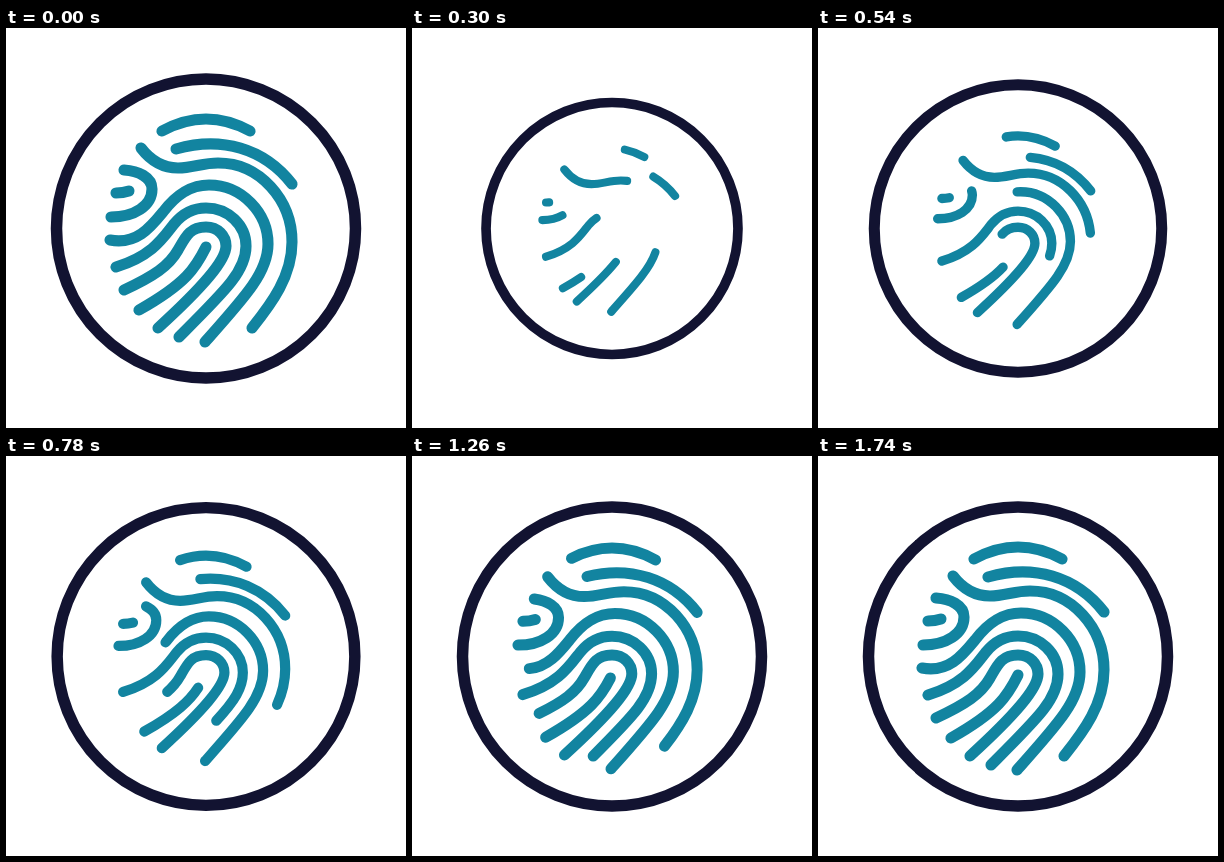
These frames come from a looping animation (400x400 px, 1.8 s). An HTML page:

```html
<!DOCTYPE html>
<html lang="en">
<head>
<meta charset="utf-8">
<title>Fingerprint</title>
<style>
html, body { margin: 0; width: 100%; height: 100%; overflow: hidden; background: #fff; }
svg { display: block; width: 100%; height: 100%; }
g { fill: none; stroke-linecap: round; stroke-linejoin: round; }
</style>
</head>
<body>
<svg viewBox="0 0 400 400">
  <g id="ring" stroke="#121331" stroke-width="11.5"><circle r="149.5"/></g>
  <g id="print" stroke="#1284a0" stroke-width="11.1"></g>
</svg>
<script>
const LOOP = 1800, STEP = 30, END = 1740;
const ERASED = 230, REDRAW = 245;

// Ridges of the print; those in "back" erase from their start and regrow from it.
const ridges = [
  "M156 103Q200 79 244 103",
  "M170 121C215 108 258 120 286 156",
  "M118 142C132 143 146 149 146 161C146 178 128 189 105 189",
  "M104 212C130 217 144 200 157 184C170 167 184 157 203 157C236 157 262 185 262 216C262 244 240 268 199 314",
  "M118 262C148 248 163 238 172 222C180 208 184 199 200 199C212 199 220 208 220 218C220 232 198 258 152 300",
  "M200 219C190 239 181 255 133 282"
];
const back = [
  "M135 120C145 133 157 140 172 140C187 140 196 135 212 135C254 135 286 172 286 214C286 248 266 275 246 300",
  "M110 239C146 228 157 210 168 196C177 185 188 180 200 180C222 180 240 197 240 218C240 243 220 262 173 309",
  "M110 165Q117 165 123 163"
];

const ring = document.getElementById("ring");
const print = document.getElementById("print");

function addRidge(d, reversed) {
  const el = document.createElementNS("http://www.w3.org/2000/svg", "path");
  el.setAttribute("d", d);
  el.setAttribute("pathLength", 1);
  print.append(el);
  return { el, reversed };
}
const lines = [...ridges.map(d => addRidge(d, false)), ...back.map(d => addRidge(d, true))];

const clamp = x => Math.min(1, Math.max(0, x));
const progress = (t, from, to) => clamp((t - from) / (to - from));

// Cubic easing (0, .5, .27, 1), solved by bisection.
function easeDraw(x) {
  let lo = 0, hi = 1;
  for (let i = 0; i < 30; i++) {
    const s = (lo + hi) / 2;
    if (.81 * s * s * (1 - s) + s ** 3 < x) lo = s; else hi = s;
  }
  const s = hi, r = 1 - s;
  return 1.5 * s * r * r + 3 * s * s * r + s ** 3;
}

// Linear press down, then a power ease-out back to full size.
function press(t, depth, low, end, power) {
  const away = t < low ? t / low : (1 - progress(t, low, end)) ** power;
  return 1 - depth * away;
}

function setScale(el, k, origin) {
  el.setAttribute("transform", `translate(200 200.5) scale(${k}) ${origin}`);
}

function draw(t) {
  setScale(ring, press(t, .2, 250, 1110, 4), "");
  setScale(print, press(t, .29, 260, END, 3), "translate(-200 -200.5)");

  const erasing = t < REDRAW;
  const shown = erasing ? 1 - progress(t, 0, ERASED) : easeDraw(progress(t, REDRAW, END));
  for (const { el, reversed } of lines) {
    const atStart = erasing !== reversed;
    el.style.visibility = shown > .001 ? "visible" : "hidden";
    el.setAttribute("stroke-dasharray", `${shown} 2`);
    el.setAttribute("stroke-dashoffset", atStart ? 0 : shown - 1);
  }
}

const begin = performance.now();
function tick() {
  const t = (performance.now() - begin) % LOOP;
  draw(Math.min(END, Math.floor(t / STEP) * STEP));
  requestAnimationFrame(tick);
}
tick();
</script>
</body>
</html>
```
